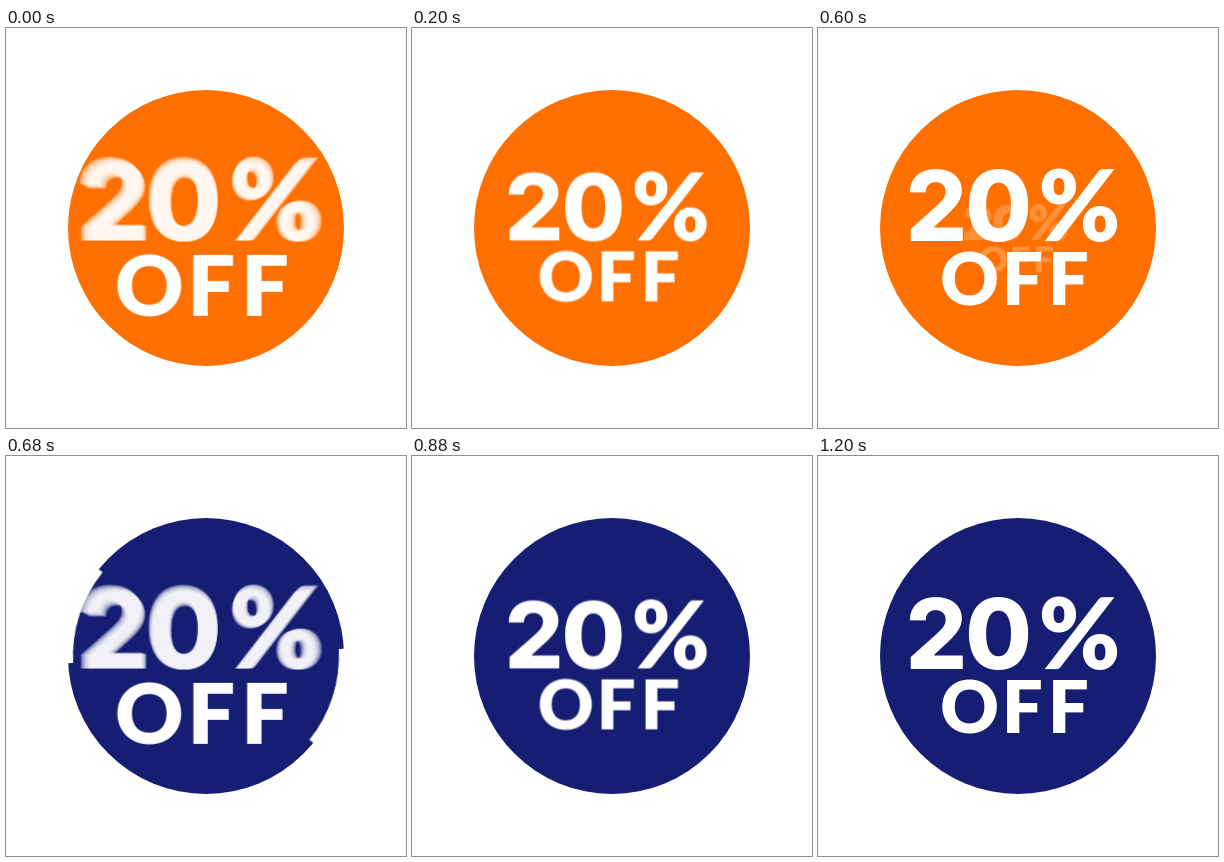
Write an HTML page without scripts that moves like this. It is 400x400 px and loops after 1280 ms.

```html
<!DOCTYPE html>
<html lang="en">
<head>
<meta charset="utf-8">
<title>20% off badge</title>
<style>
  html, body { margin: 0; width: 100%; height: 100%; overflow: hidden; background: #fff; }
  svg { display: block; width: 100%; height: 100%; }

  svg * { animation: 1280ms step-end infinite; }
  text { fill: #fff; text-anchor: middle; }
  .amount { font: 800 97px Inter, sans-serif; }
  .percent { font: 900 98px Lato, sans-serif; }
  .off { font: 900 72px Lato, sans-serif; }

  .disc { animation-name: recolor; }
  .rim { fill: none; stroke: #fff; stroke-width: 10; transform-origin: 200px 200px; animation-name: spin; }

  .first { animation-name: first; }
  .second { animation-name: second; }
  .pop, #trail use { transform-origin: 200px 212px; }
  .pop { animation-name: pop; }
  .sharp { animation-name: sharpen; }
  .smear { animation-name: smear; }
  #trail use { opacity: .3; transform: scale(var(--s)); }
  /* the second entrance runs the same bounce 680 ms later */
  .second :is(.pop, .sharp, .smear) { animation-delay: -600ms; }

  @keyframes recolor { 0% { fill: #ff7000; } 50%, 100% { fill: #151e72; } }
  @keyframes first { 0% { visibility: visible; } 50%, 100% { visibility: hidden; } }
  @keyframes second { 0% { visibility: hidden; } 46.875%, 100% { visibility: visible; } }

  @keyframes spin {
    0%, 6.25%, 59.375%, 100% { opacity: 0; transform: rotate(-3deg); }
    3.125%, 56.25% { opacity: 1; transform: rotate(26deg); }
    53.125% { opacity: 1; transform: rotate(-3deg); }
  }

  @keyframes pop {
    0% { transform: scale(1.17); }
    3.125% { transform: scale(1.17); }
    6.25% { transform: scale(1.1); }
    9.375% { transform: scale(1.03); }
    12.5% { transform: scale(.97); }
    15.625% { transform: scale(.955); }
    18.75% { transform: scale(.962); }
    21.875% { transform: scale(.983); }
    25% { transform: scale(1); }
    28.125% { transform: scale(1.008); }
    31.25% { transform: scale(1.006); }
    34.375%, 93.74% { transform: scale(1); opacity: 1; }
    93.75% { transform: scale(.51); opacity: .25; }
    96.875%, 100% { transform: scale(.88); opacity: 1; }
  }
  @keyframes sharpen { 0%, 93.75%, 100% { opacity: 0; } 3.125% { opacity: 1; } }
  @keyframes smear { 0%, 93.75%, 100% { opacity: 1; } 3.125% { opacity: 0; } }
</style>
</head>
<body>
<svg viewBox="0 0 400 400">
  <defs>
    <text id="amount" class="amount" x="118.5 180.5" y="212.5">20<tspan class="percent" x="261.5">%</tspan></text>
    <g id="trail">
      <use href="#amount" style="--s:1"/>
      <use href="#amount" style="--s:.989"/>
      <use href="#amount" style="--s:.978"/>
      <use href="#amount" style="--s:.967"/>
      <use href="#amount" style="--s:.956"/>
      <use href="#amount" style="--s:.945"/>
      <use href="#amount" style="--s:.934"/>
      <use href="#amount" style="--s:.923"/>
    </g>
    <text id="off" class="off" x="151.5 204.5 250.5" y="276.5">OFF</text>
  </defs>

  <circle class="disc" cx="200" cy="200" r="138"/>
  <circle class="rim" cx="200" cy="200" r="138" pathLength="360" stroke-dasharray="42 138"/>

  <g class="first">
    <g class="pop">
      <use class="sharp" href="#amount"/>
      <use class="smear" href="#trail"/>
      <use href="#off"/>
    </g>
  </g>
  <g class="second">
    <g class="pop">
      <use class="sharp" href="#amount"/>
      <use class="smear" href="#trail"/>
      <use href="#off"/>
    </g>
  </g>
</svg>
</body>
</html>
```
